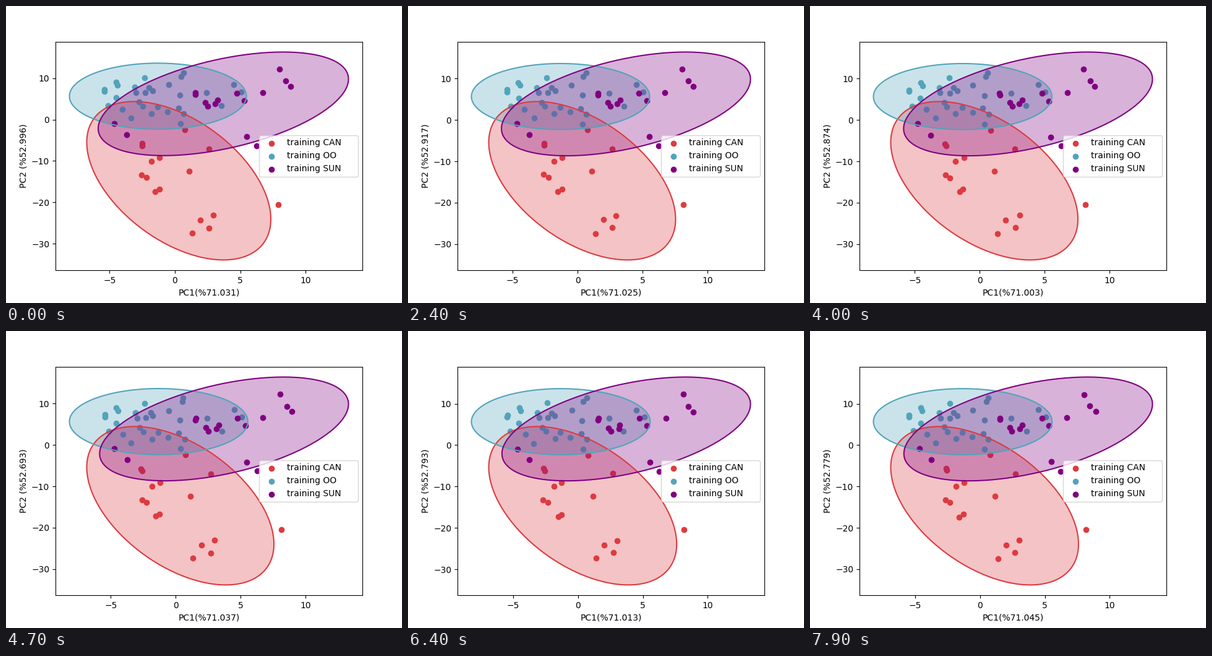
Recreate the animation shown at these times as a matplotlib script. Size 640 by 480 pixels, loop 8 s.

```python
import numpy as np
import matplotlib.pyplot as plt
from matplotlib.animation import FuncAnimation

FRAMES, INTERVAL = 80, 100
T = np.linspace(0, 2 * np.pi, 200)
X_TICKS = np.arange(-5, 11, 5)
Y_TICKS = np.arange(-30, 11, 10)


def scatter_pairs(centres, first_gap, last_gap, slope, singles):
    """Split each centre into two dots, the gap growing along the list."""
    centres = np.array(centres, float)
    dx = np.linspace(first_gap, last_gap, len(centres))
    gap = np.column_stack([dx, 1.5 + slope * np.abs(dx)])
    return np.vstack([centres - gap, centres + gap, singles])


def ellipse(left, right, top, bottom, rho):
    """Outline from its bounding box and correlation."""
    x = (left + right) / 2 + (right - left) / 2 * np.cos(T)
    y = (top + bottom) / 2 + (bottom - top) / 2 * np.cos(T - np.arccos(rho))
    return np.column_stack([x, y])


class Group:
    def __init__(self, ax, name, color, dots):
        self.base = dots
        self.area, = ax.fill([0, 1, 1], [0, 0, 1], color=color, alpha=0.3, lw=0)
        # Padding the name widens the legend box.
        self.dots = ax.scatter(*dots.T, color=color,
                               label=f"training {name:<8}")
        self.line, = ax.plot([], [], color=color, lw=1.5,
                             solid_capstyle="butt")

    def place(self, outline, shift, noise):
        self.dots.set_offsets(self.base + shift + noise(self.base.shape)
                              * (0.7, 0.35))
        self.area.set_xy(outline)
        self.line.set_data(*outline.T)


def tick_labels(values):
    return [str(v).replace("-", "\u2212") for v in values]


# The axes use stage pixels, y pointing down.
fig, ax = plt.subplots(figsize=(6.4, 4.8), dpi=100)
can = Group(ax, "CAN", "#dc3b40", scatter_pairs(
    [(317, 363), (327, 342), (242, 248), (245, 298), (220, 224), (223, 275)],
    -14, 4, 0.2,
    [(291, 200), (331, 231), (298, 267), (445, 321)]))
oo = Group(ax, "OO", "#52a4ba", scatter_pairs(
    [(217, 124), (172, 155), (241, 169), (229, 136), (286, 111), (160, 137),
     (180, 126), (219, 159), (284, 170), (375, 133), (196, 174), (273, 136),
     (272, 181), (337, 151)],
    -8, 12, 0.75,
    [(211, 140), (238, 137)]))
sun = Group(ax, "SUN", "purple", scatter_pairs(
    [(341, 155), (307, 142), (325, 159), (457, 126), (380, 147), (398, 219),
     (186, 199)],
    -2, 10, 0.75,
    [(416, 140), (443, 102)]))
ax.set_xlim(80, 576)
ax.set_ylim(427.2, 57.6)
ax.legend(loc="center right")


def update(i):
    rng = np.random.default_rng(i + 100)
    settle = 0.9 * (1 - np.exp(-i / 16))

    def noise(size=None):
        return settle * rng.normal(size=size)

    drift = settle + 0.06 * noise()
    x0 = 272.9 + 1.9 * drift
    y0 = 183.5 + drift
    lift = y0 - 184
    pull = drift - 0.8

    stretch = np.zeros_like(can.base)
    stretch[:, 0] = 0.03 * (can.base[:, 0] - 220) * pull
    can.place(ellipse(130.5, 428 + 6.5 * drift, 154.4, 410.4, 0.485),
              stretch, noise)
    oo.place(ellipse(102.5, 388.5 + 3 * drift, 92.8 + 0.8 * lift,
                     199.6 + 0.8 * lift, 0),
             (1.2 * pull, 0.7 * lift), noise)
    sun.place(ellipse(149 + 3 * drift, 553.5, 74.4, 242 + 0.4 * lift, -0.477),
              (1.2 * pull, 0.4 * lift), noise)

    ax.set_xticks(x0 + (21.12 - 0.15 * drift) * X_TICKS, tick_labels(X_TICKS))
    ax.set_yticks(y0 - 6.685 * Y_TICKS, tick_labels(Y_TICKS))
    ax.set_xlabel(f"PC1(%{71.031 - 0.015 * drift + 0.03 * noise():.3f})")
    ax.set_ylabel(f"PC2 (%{52.996 - 0.19 * drift + 0.06 * noise():.3f})")
    return []


anim = FuncAnimation(fig, update, frames=FRAMES, interval=INTERVAL,
                     init_func=lambda: update(0), repeat=True, repeat_delay=0)
plt.show()
```
